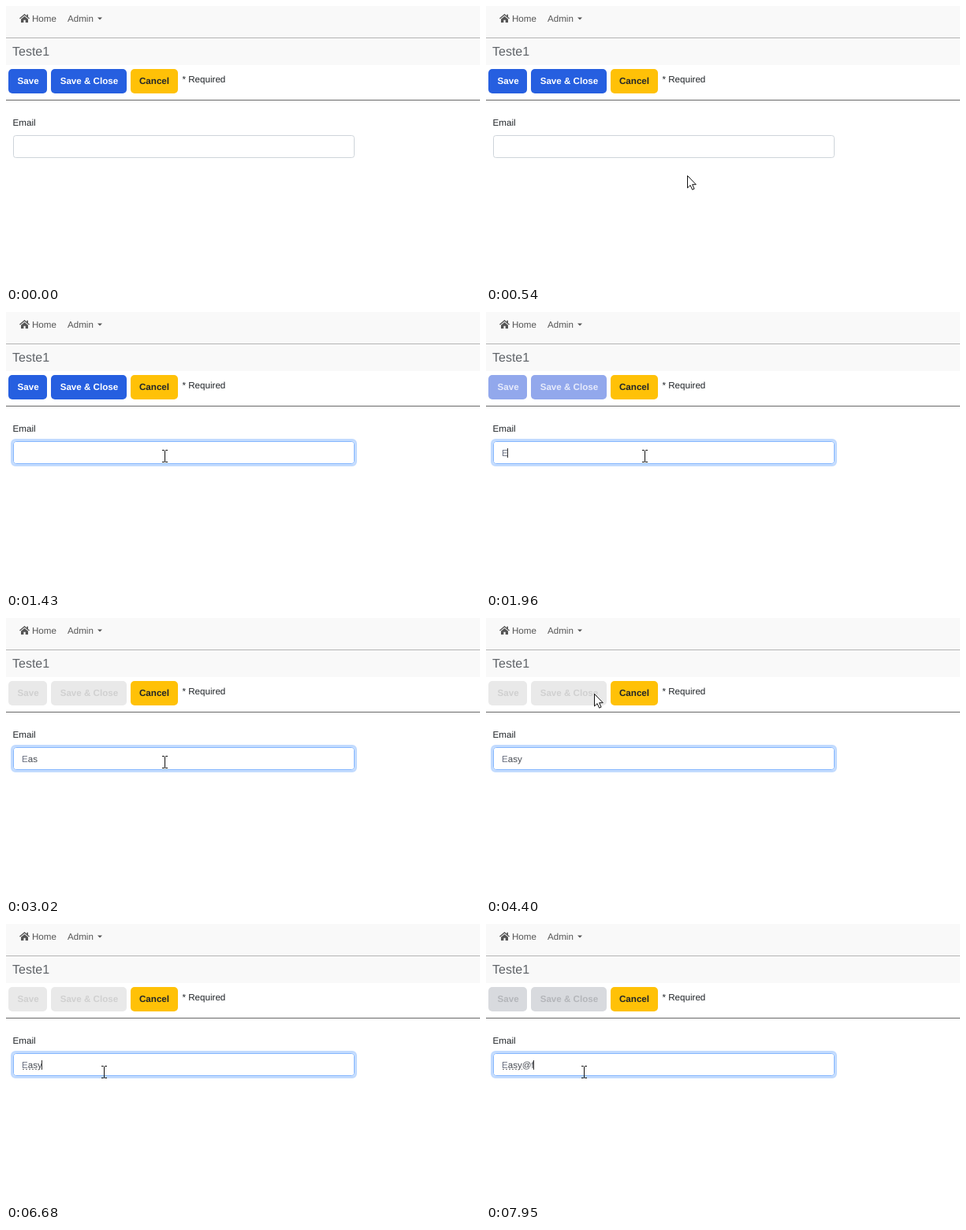
Write an HTML page that moves like this. It is 601 px wide and 353 px high and loops after 8 s.

```html
<!DOCTYPE html>
<html lang="en">
<head>
<meta charset="utf-8">
<title>Email form</title>
<style>
  html, body { margin: 0; width: 100%; height: 100%; overflow: hidden; background: #fff; }
  svg { display: block; width: 100vw; height: 100vh; }
  text { font: 11.6px "Liberation Sans", Arial, sans-serif; fill: #212529; text-rendering: geometricPrecision; white-space: pre; }
  .nav text { fill: #555; }
  .nav path { fill: #555; }
  .title { font-size: 16px; fill: #5f6368; }
  .button text { font-weight: bold; }
  .blue rect { fill: #265fe0; }
  .blue text { fill: #fff; }
  .fading .blue rect { fill: #92a8ec; }
  .fading .blue text { fill: #e6eafb; }
  .disabled .blue rect { fill: #e9e9e9; }
  .disabled .blue text { fill: #d0d0d0; }
  .enabling .blue rect { fill: #d8dade; }
  .enabling .blue text { fill: #b4b6ba; }
  #value { fill: #4a4e55; }
  #value tspan { fill: #6d7383; }
</style>
</head>
<body>
<svg viewBox="0 0 601 353" preserveAspectRatio="none">
  <rect width="601" height="75" fill="#f9f9f9"/>
  <rect y="40" width="601" height="1" fill="#b4b4b4"/>
  <rect y="119" width="601" height="1" fill="#686868"/>

  <g class="nav">
    <path d="M23.5 10 17 15.6l.9 1 5.6-4.8 5.6 4.8.9-1-2-1.7V10.700h-1.600v1.900z"/>
    <path d="M23.500 13 19 16.800V21h3.400v-3.200h2.300V21H28v-4.200z"/>
    <text x="33" y="20">Home</text>
    <text x="78" y="20">Admin</text>
    <path d="M116 14.500h6l-3 3z"/>
  </g>
  <text class="title" x="8" y="63">Teste1</text>

  <g id="toolbar">
    <g class="button blue"><rect x="3" y="80" width="49" height="31" rx="5"/><text x="14.600" y="99">Save</text></g>
    <g class="button blue"><rect x="57" y="80" width="96" height="31" rx="5"/><text x="68.700" y="99">Save &amp; Close</text></g>
    <g class="button"><rect x="158" y="80" width="60" height="31" rx="5" fill="#ffc107"/><text x="169" y="99">Cancel</text></g>
  </g>
  <text x="223.500" y="97">* Required</text>
  <text x="8.600" y="152">Email</text>

  <rect id="glow" x="7.500" y="162.500" width="436" height="32" rx="4.500" fill="none" stroke="#c2dbfe" stroke-width="3"/>
  <rect id="field" x="9.500" y="164.500" width="432" height="28" rx="3" fill="#fff" stroke="#ced4da"/>
  <text id="value" x="20" y="183"><tspan id="first"></tspan><tspan id="rest" style="fill:inherit"></tspan></text>
  <path id="spelling" d="M21 184.500H46" stroke="#777" stroke-dasharray="2 2"/>
  <rect id="caret" y="173" width="1" height="12" fill="#333"/>

  <circle id="press" cx="199" cy="183" r="12" fill="#ffff85"/>
  <g id="pointer">
    <path id="arrow" d="M.5.5v15.500l3.600-3.400 2.500 5.600 2.500-1.100-2.500-5.400h4.700z" fill="#fff" stroke="#111"/>
    <path id="beam" d="M-3-7.500h2.500l1 1 1-1H4M.5-6.500v14M-3 7.500h2.500l1-1 1 1H4" fill="none" stroke="#111"/>
  </g>
</svg>
<script>
const LOOP = 8000, BLINK = 530, STEP = 70;
const $ = id => document.getElementById(id);

const typing = [[0, ''], [1960, 'E'], [2290, 'Ea'], [2490, 'Eas'], [3440, 'Easy'], [7220, 'Easy@'], [7950, 'Easy@f']];
const blinkStarts = [900, 1960, 2290, 2490, 3440, 5620, 7220, 7950];
const focusLevels = [[0, 0], [970, 0.2], [1030, 0.65], [1090, 1]];
const buttonStates = [[0, ''], [1960, 'fading'], [2020, 'disabled'], [7950, 'enabling']];

// Pointer path: time, x, y
const path = [
  [120, 449, 328], [400, 300, 240], [680, 210, 190], [820, 201, 183],
  [3970, 201, 183], [4110, 203, 176], [4390, 137, 96], [4530, 124, 90], [4730, 116, 92],
  [4860, 114, 92], [5140, 103, 93], [5210, 104, 98], [5550, 124, 188]
];
const moveStarts = [120, 3970, 4860];

const latest = (list, t) => list.filter(([start]) => start <= t).pop()[1];
const lastBefore = (times, t) => times.filter(start => start <= t).pop();
const show = (id, on) => { $(id).style.display = on ? '' : 'none'; };

function pointerAt(t) {
  const start = lastBefore(moveStarts, t);
  const time = start + Math.floor((t - start) / STEP) * STEP;
  const next = path.findIndex(p => p[0] > time);
  if (next < 0) return path[path.length - 1].slice(1);
  const [t0, x0, y0] = path[next - 1], [t1, x1, y1] = path[next];
  const k = (time - t0) / (t1 - t0);
  return [Math.round(x0 + (x1 - x0) * k), Math.round(y0 + (y1 - y0) * k)];
}

function drawPointer(t) {
  show('pointer', t >= 120);
  if (t < 120) return;
  const [x, y] = pointerAt(t);
  const overField = x >= 9 && x < 442 && y >= 164 && y < 193;
  $('pointer').setAttribute('transform', `translate(${x} ${y})`);
  show('beam', overField);
  show('arrow', !overField);
}

function drawField(t) {
  const focus = latest(focusLevels, t);
  const mix = (from, to) => Math.round(from + (to - from) * focus);
  $('glow').style.opacity = focus < 0.5 ? 0 : focus;
  $('field').style.stroke = `rgb(${mix(206, 134)},${mix(212, 183)},${mix(218, 254)})`;

  const text = latest(typing, t);
  $('first').textContent = text.slice(0, 1);
  $('rest').textContent = text.slice(1);
  show('spelling', t >= 4500);

  const start = lastBefore(blinkStarts, t);
  show('caret', start !== undefined && Math.floor((t - start) / BLINK) % 2 === 0);
  $('caret').setAttribute('x', 20 + Math.floor(text ? $('value').getComputedTextLength() : 0));
}

function draw() {
  const t = performance.now() % LOOP;
  $('toolbar').setAttribute('class', latest(buttonStates, t));
  show('press', t >= 900 && t < 1030);
  drawField(t);
  drawPointer(t);
  requestAnimationFrame(draw);
}
draw();
</script>
</body>
</html>
```
